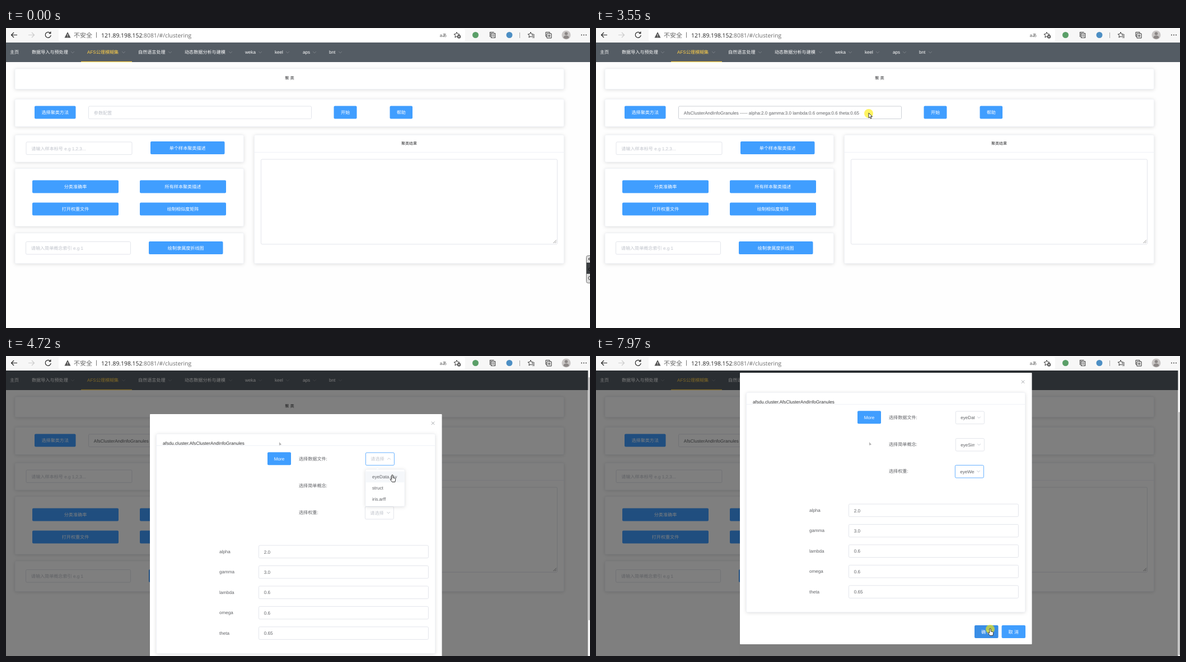
An HTML page for the animation above (8000 ms loop, 1043 by 537 pixels).

```html
<!DOCTYPE html>
<html lang="zh">
<meta charset="utf-8">
<title>聚类</title>
<style>
html,body{margin:0;width:100%;height:100%;overflow:hidden;background:#fff}
svg{display:block;width:100vw;height:100vh}
text{font-family:"Liberation Sans","Noto Sans CJK SC","Noto Sans CJK",sans-serif;white-space:pre;text-rendering:geometricPrecision}
.ui{font-family:"Open Sans","Noto Sans CJK SC","Noto Sans CJK",sans-serif}
.tree text{font-family:"DejaVu Sans",sans-serif}
.card{filter:drop-shadow(0 1px 3px rgba(0,0,0,.13))}
</style>
<svg id="stage" viewBox="0 0 1043 537"></svg>
<script>
const BLUE = '#409eff', GREY = '#606266', PALE = '#c0c4cc', LINE = '#dcdfe6';

const text = (x, y, s, fill = GREY, size = 8.1, anchor = 'start', attr = '') =>
  `<text x="${x}" y="${y}" fill="${fill}" font-size="${size}" text-anchor="${anchor}" ${attr}>${s}</text>`;
const rect = (x, y, w, h, fill, attr = '') =>
  `<rect x="${x}" y="${y}" width="${w}" height="${h}" fill="${fill}" ${attr}/>`;
const path = (d, stroke = '#333', width = 1, attr = '') =>
  `<path d="${d}" fill="none" stroke="${stroke}" stroke-width="${width}" ${attr}/>`;
const circle = (x, y, r, fill, attr = '') => `<circle cx="${x}" cy="${y}" r="${r}" fill="${fill}" ${attr}/>`;
const group = (id, body, attr = '') => `<g id="${id}" ${attr}>${body}</g>`;
const card = (x, y, w, h) => rect(x, y, w, h, '#fff', 'class="card" stroke="#ebeef5" stroke-width=".6" rx="2"');
const button = (x, y, w, s, id = '', h = 23) =>
  rect(x, y, w, h, BLUE, `rx="2" id="${id}"`) + text(x + w / 2, y + h / 2 + 3, s, '#fff', 8.1, 'middle');
const input = (x, y, w, s, fill = PALE, id = '') =>
  rect(x, y, w, 22.6, '#fff', `rx="2" stroke="${LINE}" stroke-width=".8" id="${id}"`) +
  text(x + 9.3, y + 14.5, s, fill, 8.1, 'start', id && `id="${id}Text"`);
const chevron = (x, y, up) => `M${x - 2.8} ${y + (up ? 1.4 : -1.4)}l2.8 ${up ? -2.8 : 2.8} 2.8 ${up ? 2.8 : -2.8}`;

function browserBar() {
  const star = (x, y) => path(`M${x} ${y - 5}l1.5 3.2 3.5.4-2.6 2.3.7 3.5-3.1-1.8-3.1 1.8.7-3.5-2.6-2.3 3.5-.4z`);
  return rect(0, 0, 1043, 26, '#f7f7f7') + rect(94, 2, 726, 22, '#fff', 'rx="3"') +
    path('M20 12.500H9.500M14 8l-4.500 4.500 4.500 4.500', '#222', 1.2) +
    path('M40 12.500H50.500M46 8l4.500 4.500-4.500 4.500', '#ccc', 1.2) +
    path('M79 9a5 5 0 1 0 1.200 4M79.800 6.500v3.200h-3.200', '#222', 1.2) +
    '<path d="M110 7l5.500 10.500h-11z" fill="#555"/>' + path('M110 11v3.300M110 15.300v1', '#fff', 1) +
    text(121, 16.5, '不安全', '#666', 11, 'start', 'class="ui"') + path('M161.500 7.500v10', '#777', 1) +
    text(170, 16.5, '121.89.198.152<tspan fill="#6b6b6b">:8081/#/clustering</tspan>', '#222', 10.35, 'start', 'class="ui"') +
    text(781, 15.5, 'aあ', '#555', 8, 'middle') + star(805, 12.5) + circle(809, 15.5, 3.2, '#555') +
    path('M807.300 15.500h3.400M809 13.800v3.400', '#fff', .8) +
    circle(838.5, 12.5, 5.5, '#5a9f68') +
    path('M864.500 16V7.500h7M866.500 9.500h7v8h-7zM868 12h4M868 14.500h4', '#444', 1.2) +
    circle(899, 12.5, 5.5, '#4d8fc4') + path('M917.500 8v10', '#aaa') +
    star(937, 12.5) + rect(939, 11, 6, 7, '#f7f7f7') + path('M939 12h5M939 14.500h5M940 17h4') +
    path('M966 15h-2V7.500h7v2M966 10h8v8h-8zM970 11.500v5M967.500 14h5') +
    circle(1000.5, 12.5, 8, '#c9c6c5') + circle(1000.5, 10, 2.8, '#8b8685') +
    '<path d="M995.500 17.500q0-4 5-4t5 4q-5 4-10 0" fill="#8b8685"/>' +
    [1028, 1032, 1036].map(x => circle(x, 12.5, .9, '#333')).join('');
}

function page() {
  const nav = [[46, '数据导入与预处理', 119], [145, 'AFS公理模糊集', 210], [236, '自然语言处理', 293],
    [319, '动态数据分析与建模', 401], [427, 'weka', 454], [480, 'keel', 503], [530, 'aps', 551], [577, 'bnt', 597]];
  return rect(0, 26, 1043, 511, '#fefefe') + rect(0, 26, 1043, 35, '#545c64') + text(7, 46, '主页', '#fff') +
    nav.map(([x, s, c], i) => text(x, 46, s, i == 1 ? '#ffd04b' : '#fff') + path(chevron(c, 43.5), '#8b9097', .7)).join('') +
    rect(134, 59.8, 91, 1.3, '#ffd04b') +
    card(16, 73, 980.5, 36.5) + text(506.5, 92, '聚 类', '#303133', 7.2, 'middle') +
    card(16, 127.5, 980.5, 49) + button(51, 139.5, 73.5, '选择聚类方法', 'method') +
    input(147.5, 140, 398, '参数配置', PALE, 'config') +
    button(585.5, 139.5, 41, '开始') + button(685.5, 139.5, 40.5, '帮助') +
    card(16, 191.5, 408.5, 48.5) + input(36, 204, 189, '请输入样本标号 e.g 1,2,3...') + button(258, 203, 132.5, '单个样本聚类描述') +
    card(16, 251.5, 408.5, 103.5) + button(47, 272.5, 154, '分类准确率') + button(239, 272.5, 154, '所有样本聚类描述') +
    button(47, 312.5, 154, '打开权重文件') + button(239, 312.5, 154, '绘制相似度矩阵') +
    card(16, 367, 408.5, 54.5) + input(35.5, 382.5, 187, '请输入简单概念索引 e.g 1') + button(255, 382, 132.5, '绘制隶属度折线图') +
    card(443.5, 191.5, 553, 230) + text(720, 209, '聚类结果', '#303133', 7, 'middle') + path('M443.500 222.500h553', '#ebeef5', .8) +
    rect(455.5, 235, 529, 152, '#fff', `rx="2" stroke="${LINE}" stroke-width=".8"`) +
    path('M977.500 385l5.500-5.500M980.500 385l2.500-2.500', '#666', .7);
}

function treePopup() {
  const box = (x, y) => rect(x - 2.5, y - 2.5, 5, 5, '#fff', 'stroke="#777" stroke-width=".7"') + path(`M${x - 1.5} ${y}h3`, '#333', .7);
  const folder = (x, y) => `<path d="M${x} ${y - 3}h3l1 1h4.500v5.500h-8.500z" fill="#f8dd79" stroke="#c9a23f" stroke-width=".6"/>`;
  const leaves = ['AfsClusterBasedSemantic', 'AfsSpectralCluster', 'ClusterBase', 'AfsClusterAndInfoGranules', 'HAFSCluster'];
  return rect(7.5, 179.5, 206, 98, '#fcfef5', 'stroke="#ddd" stroke-width=".8"') +
    path('M26 192v4M36.500 203v48', '#bbb', .6, 'stroke-dasharray="1"') +
    box(15.5, 188.5) + folder(22, 188.5) + text(31, 191, 'afsdu', '#333', 6.9) +
    box(26, 198.5) + folder(32, 198.5) + text(41.5, 201, 'cluster', '#333', 6.9) +
    leaves.map((s, i) => {
      const y = 209 + i * 10.4;
      return path(`M36.500 ${y}h5`, '#bbb', .6, 'stroke-dasharray="1"') +
        `<path d="M43 ${y - 3.5}h4l2.300 2.300v5h-6.300z" fill="#eef4ff" stroke="#6a7fa5" stroke-width=".7"/>` +
        text(52, y + 2.5, s, '#333', 6.9, 'start', i == 3 ? 'id="leaf"' : '');
    }).join('') +
    rect(94.5, 258.5, 32, 16, '#ecf5ff', 'rx="8" stroke="#b3d8ff" stroke-width=".8"') + text(110.5, 268.7, '关闭', BLUE, 7, 'middle');
}

// Select boxes: position, chosen text, options, and the times of opening and choosing.
const selects = [
  { x: 642, y: 173, label: '选择数据文件:', items: ['eyeData.csv', 'struct', 'iris.arff'], w: 70, open: 4370, pick: 4840 },
  { x: 642, y: 221.5, label: '选择简单概念:', items: ['eyeSimpleConcept.txt'], w: 104, open: 5240, pick: 5740 },
  { x: 641, y: 269.5, label: '选择权重:', items: ['eyeWeight.txt'], w: 77, open: 6330, pick: 6940 }
];

function dialog() {
  const params = [['alpha', '2.0'], ['gamma', '3.0'], ['lambda', '0.6'], ['omega', '0.6'], ['theta', '0.65']];
  return rect(257, 104, 521.5, 486, '#fff', 'rx="1"') + path('M759.800 117.500l5.500 5.500M765.300 117.500l-5.500 5.500', '#909399', .8) +
    card(268.5, 139.5, 498, 393) + path('M268.500 160.500h498', '#ebeef5', .8) +
    text(280, 158.5, 'afsdu.cluster.AfsClusterAndInfoGranules', '#303133') + button(467, 172.3, 42, 'More') +
    selects.map((s, i) => text(523, s.y + 13.5, s.label) +
      rect(s.x + .4, s.y, 51, 22.6, '#fff', `rx="2" stroke-width=".8" id="box${i}"`) +
      `<clipPath id="clip${i}"><rect x="${s.x}" y="${s.y}" width="34.500" height="23"/></clipPath>` +
      text(s.x + 9.3, s.y + 14.2, '', PALE, 8.1, 'start', `id="value${i}" clip-path="url(#clip${i})"`) +
      path('', PALE, .9, `id="chev${i}"`)).join('') +
    params.map(([k, v], i) => text(381, 353 + i * 36.4, k) + input(451.4, 339 + i * 36.45, 303, v, GREY)).join('') +
    button(676, 556, 42.5, '确 定', 'ok') + button(724.5, 556, 42.5, '取 消') +
    selects.map((s, i) => {
      const top = s.y + 30, h = s.items.length * 19.7 + 7;
      return group('menu' + i, card(s.x, top, s.w, h) + `<path d="M${s.x + 18} ${top + .3}l3.500-3.300 3.500 3.300z" fill="#fff" stroke="#ebeef5" stroke-width=".5"/>` +
        rect(s.x + .5, top + 3.5, s.w - 1, 19.7, '#f5f7fa') +
        s.items.map((v, j) => text(s.x + 12, top + 16.3 + j * 19.7, v)).join(''));
    }).join('');
}

const HAND = 'M-1.200 1q0-1.200 1.200-1.200t1.200 1.200v4l3 .7q1.700.3 1.600 1.800l-1 5h-5.300l-3.300-4.500q0-1.500 1.500-.8l1.100 1z';
const ARROW = 'M0 0v9l2-1.800 1.500 3 1.500-.7-1.500-3h3z';

stage.innerHTML = page() + group('popup', treePopup(), 'class="tree"') +
  group('mask', rect(0, 26, 1039.5, 511, '#000', 'fill-opacity=".5"')) + group('modal', dialog()) +
  `<path id="trace" d="M488 154v6l4-1.500z" fill="#b4b4b4"/>` +
  group('bar', rect(1039.5, 26, 4, 511, '#f4f4f4') + rect(1040.5, 38, 2, 435, '#a8a8a8', 'rx="1" id="thumb"')) +
  group('widget', rect(1036.5, 407.5, 12, 49, '#dcdcdc', 'rx="3" stroke="#777"') + rect(1037, 420, 6, 20, '#3a3d40') +
    path('M1043 411.500l-3 2 3 2M1043 429.500a2.500 2.500 0 1 0 0 5', '#111') + path('M1043 444.500a3 3 0 1 0 0 6', '#444')) +
  browserBar() +
  group('mouse', circle(0, 1, 8, '#ffee00', 'id="halo" fill-opacity=".62"') + '<path id="pointer" fill="#fff" stroke="#222" stroke-width=".9"/>');

const $ = id => document.getElementById(id);
const set = (id, name, value) => $(id).setAttribute(name, value);
const clamp = v => Math.max(0, Math.min(1, v));
const ease = p => 1 - (1 - clamp(p)) ** 2.3;
const smooth = p => (p = clamp(p)) * p * (3 - 2 * p);
const within = (t, spans) => spans.some(([a, b]) => t >= a && t < b);
const fade = (id, t, from, to, d) => {
  const o = Math.min(ease((t - from) / d), 1 - clamp((t - to) / d));
  set(id, 'opacity', o);
  $(id).style.display = o > 0 ? '' : 'none';
};

const route = [[70, 815, 490], [300, 380, 300], [520, 40, 120], [840, 88, 147], [1490, 88, 147], [2150, 132, 243],
  [2880, 132, 243], [3180, 332, 204], [3460, 487, 152], [3740, 487, 152], [4240, 678, 186], [4380, 678, 186],
  [4600, 690, 213], [4850, 690, 213], [5170, 683, 235], [5280, 683, 235], [5560, 692, 264], [5880, 692, 264],
  [6220, 684, 283], [6360, 684, 283], [6690, 699, 318], [7590, 699, 318], [7880, 704, 488], [8000, 704, 488]];
const clicks = [[920, 1060], [2600, 2690], [3530, 3610], [4300, 4400], [4760, 4860], [5170, 5270], [5660, 5760],
  [6260, 6360], [6820, 6940], [7870, 8000]];
const hands = [[760, 1650], [2000, 2750], [4200, 7690], [7800, 8000]];

function cursorAt(t) {
  const i = Math.max(1, route.findIndex(k => k[0] > t));
  const [t0, x0, y0] = route[i - 1], [t1, x1, y1] = route[i], p = smooth((t - t0) / (t1 - t0));
  return [x0 + (x1 - x0) * p, y0 + (y1 - y0) * p];
}

function draw(t) {
  fade('popup', t, 980, 2610, 150);
  set('method', 'fill', within(t, [[840, 2670]]) ? '#66b1ff' : BLUE);
  set('leaf', 'text-decoration', within(t, [[2050, 2700]]) ? 'underline' : 'none');

  const filled = t > 2670;
  $('configText').textContent = filled
    ? 'AfsClusterAndInfoGranules ----- alpha:2.0 gamma:3.0 lambda:0.6 omega:0.6 theta:0.65' : '参数配置';
  set('configText', 'fill', filled ? GREY : PALE);
  set('config', 'stroke', within(t, [[3580, 3900]]) ? BLUE : within(t, [[3400, 3580]]) ? PALE : LINE);

  fade('mask', t, 3575, 9000, 200);
  fade('modal', t, 3575, 9000, 300);
  const scroll = 74 * smooth((t - 7100) / 380);
  set('modal', 'transform', `translate(0 ${-11.6 * (1 - ease((t - 3575) / 300)) - scroll})`);
  set('thumb', 'y', 38 + scroll * .84);
  $('bar').style.display = t > 3600 ? '' : 'none';
  $('trace').style.display = t > 3850 ? '' : 'none';
  $('widget').style.display = within(t, [[0, 1050], [3600, 3900]]) ? '' : 'none';

  selects.forEach((s, i) => {
    const open = within(t, [[s.open, s.pick]]), next = selects[i + 1], chosen = t >= s.pick;
    fade('menu' + i, t, s.open, s.pick, 150);
    set('box' + i, 'stroke', within(t, [[s.open, next ? next.open : 8000]]) ? BLUE : LINE);
    set('chev' + i, 'd', chevron(s.x + 42, s.y + 11, open));
    set('value' + i, 'fill', chosen ? GREY : PALE);
    $('value' + i).textContent = chosen ? s.items[0] : '请选择';
  });
  set('ok', 'fill', t > 7850 ? '#3a8ee6' : BLUE);

  $('mouse').style.display = t < 70 ? 'none' : '';
  set('mouse', 'transform', `translate(${cursorAt(t)})`);
  $('halo').style.display = within(t, clicks) ? '' : 'none';
  set('pointer', 'd', within(t, hands) ? HAND : ARROW);
}

const STEP = 77.27;
function tick() {
  const t = performance.now() % 8000;
  draw(t < 70 ? 0 : 70 + Math.floor((t - 58) / STEP) * STEP);
  requestAnimationFrame(tick);
}
tick();
</script>
</html>
```
